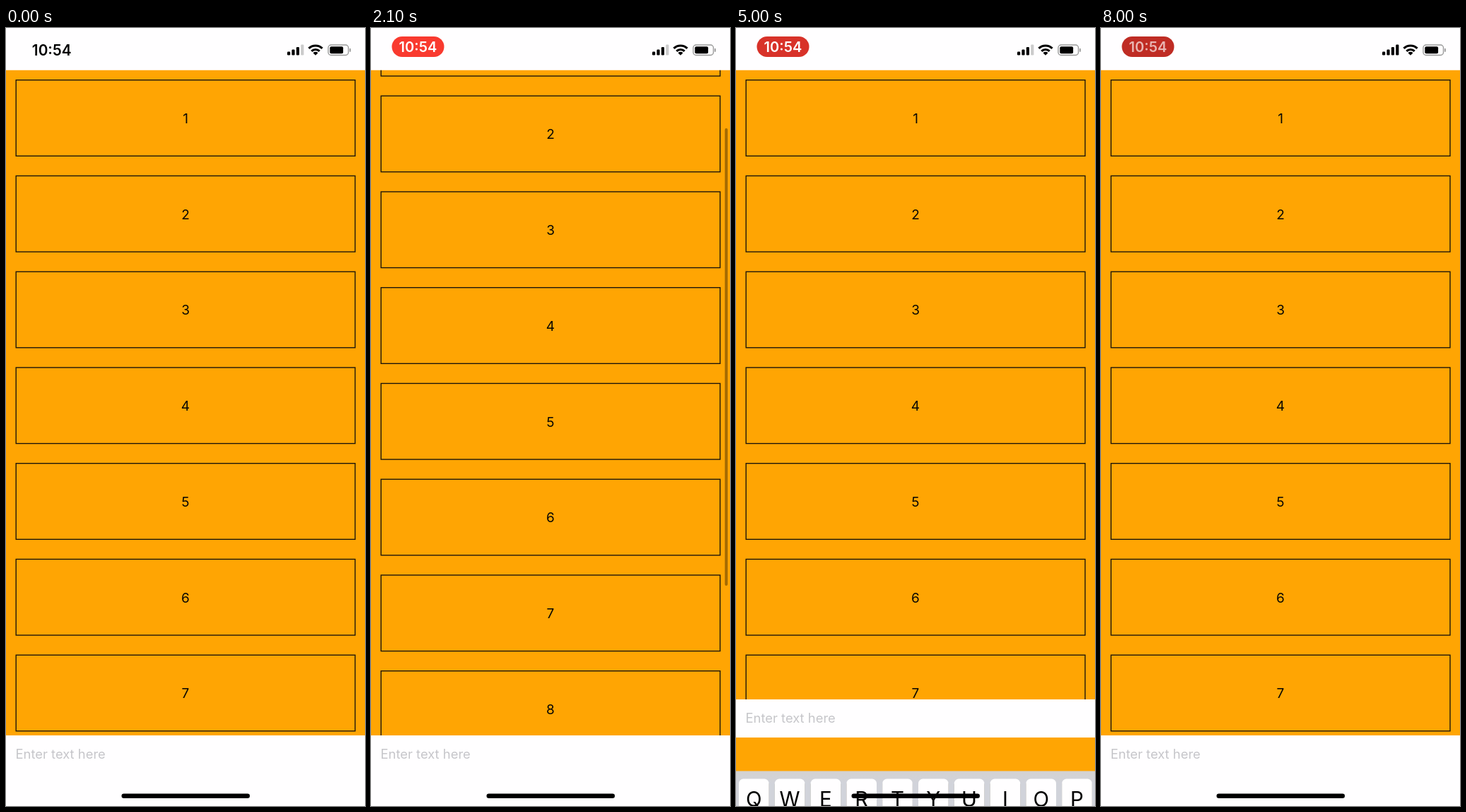
These frames come from a looping animation (508x1102 px, 8.05 s). An HTML page with a canvas:

```html
<!DOCTYPE html>
<html lang="en">
<head>
<meta charset="utf-8">
<style>
html, body { margin: 0; width: 508px; height: 1102px; overflow: hidden; background: #fffeff; }
canvas { display: block; }
</style>
</head>
<body>
<canvas id="stage" width="508" height="1102"></canvas>
<script>
const ctx = document.getElementById('stage').getContext('2d');
const LOOP = 8050, STEP = 50, WHITE = '#fffeff', ORANGE = '#ffa503';
const PITCH = 135.75, MAX_SCROLL = 414.5;
const KEYS_TRAVEL = 382, INPUT_TRAVEL = 394;
const OPENINGS = [[2950, 4753], [5750, 7069]];
// [time, offset]; the list overshoots at both ends
const SCROLL = [[950, 0], [1450, 441], [1800, MAX_SCROLL], [1850, MAX_SCROLL], [2242, -15], [2550, 0]];

const clamp = (v, lo = 0, hi = 1) => Math.min(hi, Math.max(lo, v));
const ramp = (t, from, to) => clamp((t - from) / (to - from));
const easeOut = u => 1 - (1 - u) ** 3;
const smooth = u => u * u * (3 - 2 * u);

function scrollAt(t) {
  let y = 0;
  for (let i = 1; i < SCROLL.length; i++) {
    const [t0, y0] = SCROLL[i - 1], [t1, y1] = SCROLL[i];
    if (t >= t0) y = y0 + (y1 - y0) * smooth(ramp(t, t0, t1));
  }
  return y;
}

function rect(x, y, w, h, color, r = 0) {
  ctx.fillStyle = color;
  ctx.beginPath();
  ctx.roundRect(x, y, w, h, r);
  ctx.fill();
}

function text(str, x, cy, size, color = '#000', align = 'center', weight = 400) {
  ctx.font = `${weight} ${size}px Inter, sans-serif`;
  ctx.textAlign = align;
  ctx.fillStyle = color;
  ctx.fillText(str, x, cy + size * 0.364);
}

function strokePath(d, width, color = '#000') {
  ctx.lineWidth = width;
  ctx.strokeStyle = color;
  ctx.stroke(new Path2D(d));
}

function fillPath(d, color = '#000') {
  ctx.fillStyle = color;
  ctx.fill(new Path2D(d));
}

// Tint from the orange behind the translucent keyboard, fixed to the screen
function backdrop(top, bottom) {
  const g = ctx.createLinearGradient(0, 1005, 0, 1070);
  g.addColorStop(0, top);
  g.addColorStop(1, bottom);
  return g;
}

function drawStatus(t) {
  rect(0, 0, 508, 59.5, WHITE);
  const pill = ramp(t, 250, 550);
  ctx.globalAlpha = 1 - pill;
  text('10:54', 64.7, 31, 20.8, '#000', 'center', 600);
  ctx.globalAlpha = pill;
  const pressed = ramp(t, 7800, 8000);
  const pulse = 0.5 + 0.5 * Math.cos((t - 1850) / 1000 * Math.PI);
  const light = (0.84 + 0.16 * pulse) * (1 - pressed) + 0.75 * pressed;
  const shade = c => Math.round(c * light);
  rect(29.5, 12, 74, 29, `rgb(${shade(255)},${shade(59)},${shade(48)})`, 14.5);
  text('10:54', 66.4, 27, 20, `rgba(255,255,255,${1 - 0.35 * pressed})`, 'center', 600);
  ctx.globalAlpha = 1;

  [5, 8, 11.5, 15].forEach((h, i) =>
    rect(398 + i * 6.4, 38.5 - h, 4.2, h, i < 3 || t >= 6000 ? '#000' : '#ccc', 1.2));

  ctx.lineCap = 'butt';
  [[14.5, 3.2], [9, 3.2]].forEach(([r, w]) => {
    ctx.lineWidth = w;
    ctx.strokeStyle = '#000';
    ctx.beginPath();
    ctx.arc(438, 38.5, r - 1, -Math.PI * 0.75, -Math.PI * 0.25);
    ctx.stroke();
  });
  fillPath('M438 38.7L434.5 35.2A5 5 0 0 1 441.5 35.2Z');

  ctx.lineWidth = 1.4;
  ctx.strokeStyle = '#999';
  ctx.beginPath();
  ctx.roundRect(456, 24, 28.5, 14.5, 4);
  ctx.stroke();
  rect(458.3, 26.3, 18.8, 10, '#000', 2);
  rect(486, 28.8, 1.8, 5, '#999', 1);
}

function drawList(t, inputY) {
  const offset = scrollAt(t);
  rect(0, 59.5, 508, 996.5, ORANGE);
  ctx.save();
  ctx.beginPath();
  ctx.rect(0, 59.5, 508, inputY - 59.5);
  ctx.clip();
  ctx.lineWidth = 1.35;
  ctx.strokeStyle = '#17130c';
  for (let i = 0; i < 10; i++) {
    const y = 73.7 + i * PITCH - offset;
    ctx.strokeRect(14.2, y, 479.8, 107.6);
    text(i + 1, 254, y + 54.3, 19, '#0a0804');
  }
  ctx.globalAlpha = 0.36 * ramp(t, 900, 1000) * (1 - ramp(t, 2550, 2800));
  const inside = clamp(offset, 0, MAX_SCROLL);
  const over = offset - inside;
  rect(500.7, 64 + inside * 0.688 + Math.max(over, 0), 4, 648 - Math.abs(over), '#000', 2);
  ctx.restore();
}

function drawInput(y, caret) {
  rect(0, y, 508, 54, WHITE);
  text('Enter text here', 13.5, y + 26.5, 18.4, '#c6c6ca', 'left');
  if (caret) rect(13.5, y + 13.5, 2.8, 25.5, '#3e69e4', 1.4);
}

function key(label, x, y, w, size = 29.5, special = false) {
  rect(x, y + 1.4, w, 57.5, '#8b8578', 6.5);
  rect(x, y, w, 57.5, special ? backdrop('#bca882', '#abaeb6') : WHITE, 6.5);
  text(label, x + w / 2, y + 29, size);
}

function drawKeyboard(closed) {
  const shift = KEYS_TRAVEL * closed;
  const barY = 663.5 + shift * 1.39;
  rect(0, barY, 508, 60, backdrop('#c8b795', '#bfc1c8'));
  ["I", "I'm", 'We'].forEach((word, i) => {
    text(word, 84 + i * 170, barY + 26.5, 22.5, '#fff');
    if (i) rect(i * 170.5 - 2, barY, 1.3, 57, '#e4dccb');
  });

  rect(0, 720 + shift, 508, KEYS_TRAVEL, backdrop('#dccfbb', '#d1d3da'));
  ctx.save();
  ctx.translate(0, shift);
  [['QWERTYUIOP', 4, 731], ['ASDFGHJKL', 29.3, 804.7], ['ZXCVBNM', 80, 878]].forEach(([row, x, y]) =>
    [...row].forEach((letter, i) => key(letter, x + i * 50.8, y, 42.6)));
  key('', 4, 878, 57);
  key('', 447, 878, 57, 20, true);
  key('123', 4, 951.3, 118, 20.8, true);
  key('space', 130, 951.3, 247, 20.6);
  key('return', 385.5, 951.3, 118.5, 20.6, true);

  ctx.lineCap = ctx.lineJoin = 'round';
  fillPath('M33 895.5L46 908.5H39.5V917Q39.5 918.5 38 918.5H28Q26.5 918.5 26.5 917V908.5H20Z');
  strokePath('M469 896H488Q491 896 491 899V914Q491 917 488 917H469L460 906.5ZM474 902L483 911M483 902L474 911', 1.8);
  strokePath('M36 1062a17 17 0 1 0 34 0a17 17 0 1 0 -34 0M45 1062a8 17 0 1 0 16 0a8 17 0 1 0 -16 0' +
    'M53 1045V1079M36 1062H70M40 1051Q53 1058 66 1051M40 1073Q53 1066 66 1073', 1.8, '#505158');
  strokePath('M449.5 1051a5 5 0 0 1 10 0V1065a5 5 0 0 1 -10 0Z' +
    'M445 1059V1064a9.5 9.5 0 0 0 19 0V1059M454.5 1074V1078.5M449 1078.5H460', 1.9, '#505158');
  ctx.restore();
}

function draw(t) {
  let closed = 1, caret = false;
  for (const [open, close] of OPENINGS) {
    if (t < open) continue;
    closed = t < close ? 1 - easeOut(ramp(t, open, open + 500)) : easeOut(ramp(t, close, close + 500));
    caret = t < close && (t - open) % 1000 < 700;
  }
  const inputY = 608 + INPUT_TRAVEL * closed;
  rect(0, 0, 508, 1102, WHITE);
  drawList(t, inputY);
  drawInput(inputY, caret);
  if (closed < 1) drawKeyboard(closed);
  drawStatus(t);
  rect(163.5, 1084.5, 181.5, 6.6, '#000', 3.3);
}

function tick() {
  const t = performance.now() % LOOP;
  draw(t - t % STEP);
  requestAnimationFrame(tick);
}
tick();
</script>
</body>
</html>
```
